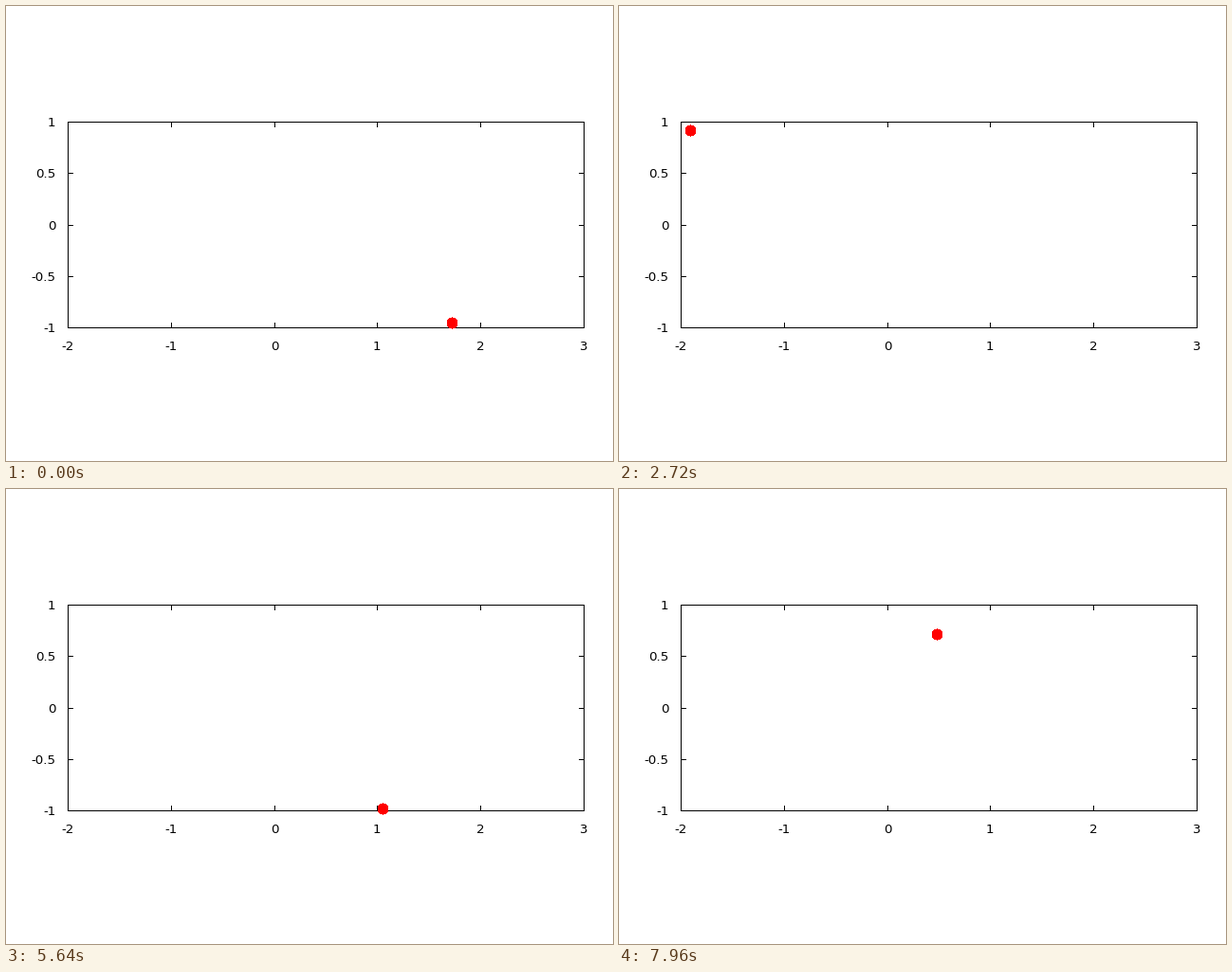
A matplotlib script for the animation above (8000 ms loop, 640x480 px).

```python
import math
import matplotlib.pyplot as plt
from matplotlib.animation import FuncAnimation
from matplotlib.patches import Polygon, Rectangle

W, H, DPI = 640, 480, 100
FRAMES, INTERVAL = 200, 40

# Plot frame in pixels and its data ranges
LEFT, RIGHT, TOP, BOTTOM = 65, 609, 122, 339
X_MIN, X_MAX, Y_MIN, Y_MAX = -2, 3, -1, 1
TIC = 5

START = (1.7225, -0.9514)
SPEED, ANGLE = 0.1, math.radians(-17)
HALF_WIDTHS = [5, 5, 5, 5, 4, 3, 0]


def to_px(x, y):
    px = LEFT + (x - X_MIN) / (X_MAX - X_MIN) * (RIGHT - LEFT)
    py = BOTTOM - (y - Y_MIN) / (Y_MAX - Y_MIN) * (BOTTOM - TOP)
    return math.floor(px + 0.5), math.floor(py + 0.5)


def inside(x, y):
    return X_MIN <= x <= X_MAX and Y_MIN <= y <= Y_MAX


def position(frame):
    """Straight flight; a velocity part flips once the ball is past a wall."""
    x, y = START
    vx, vy = SPEED * math.cos(ANGLE), SPEED * math.sin(ANGLE)
    for _ in range(frame):
        x += vx
        y += vy
        if not X_MIN <= x <= X_MAX:
            vx = -vx
        if not Y_MIN <= y <= Y_MAX:
            vy = -vy
    return x, y


def ball_outline(cx, cy):
    side = []
    for row in range(-6, 7):
        w = HALF_WIDTHS[abs(row)] + 0.5
        side += [(w, row - 0.5), (w, row + 0.5)]
    outline = side + [(-w, r) for w, r in reversed(side)]
    return [(cx + 0.5 + dx, cy + 0.5 + dy) for dx, dy in outline]


fig = plt.figure(figsize=(W / DPI, H / DPI), dpi=DPI, facecolor="white")
ax = fig.add_axes([0, 0, 1, 1])
ax.set_xlim(0, W)
ax.set_ylim(H, 0)
ax.axis("off")


def line(x0, y0, x1, y1):
    """One-pixel black line with both end pixels included."""
    ax.add_patch(Rectangle((x0, y0), x1 - x0 + 1, y1 - y0 + 1,
                           fc="black", ec="none", lw=0))


def label(x, y, text, align):
    ax.text(x, y, text, ha=align, va="baseline", color="black",
            family="DejaVu Sans", size=9.6)


for y in (TOP, BOTTOM):
    line(LEFT, y, RIGHT, y)
for x in (LEFT, RIGHT):
    line(x, TOP, x, BOTTOM)

for value in range(X_MIN, X_MAX + 1):
    x, _ = to_px(value, 0)
    line(x, TOP, x, TOP + TIC)
    line(x, BOTTOM - TIC, x, BOTTOM)
    label(x, 363, str(value), "center")

for value in (-1, -0.5, 0, 0.5, 1):
    _, y = to_px(0, value)
    line(LEFT, y, LEFT + TIC, y)
    line(RIGHT - TIC, y, RIGHT, y)
    label(52.5, y + 5, f"{value:g}", "right")

ball = Polygon(ball_outline(*to_px(*START)), fc="red", ec="none", lw=0, zorder=5)
ax.add_patch(ball)


def update(frame):
    x, y = position(frame)
    ball.set_visible(inside(x, y))
    ball.set_xy(ball_outline(*to_px(x, y)))
    return (ball,)


anim = FuncAnimation(fig, update, frames=FRAMES, interval=INTERVAL,
                     repeat=True, repeat_delay=0, blit=False)
plt.show()
```
